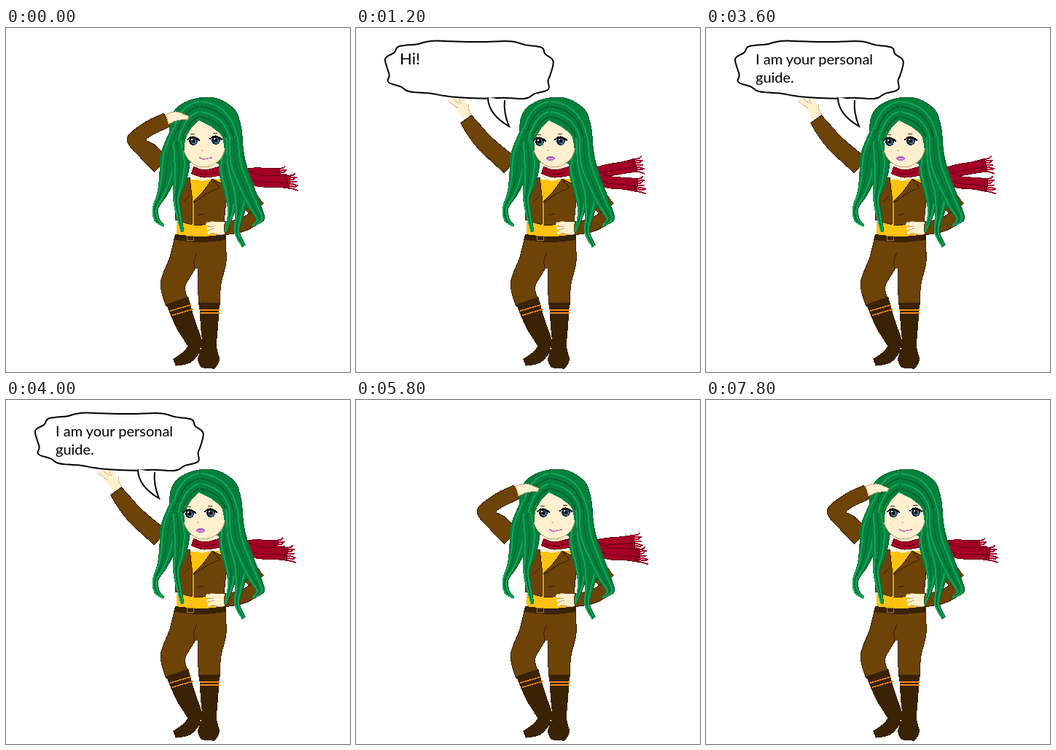
Recreate the animation shown at these times as an HTML page. Size 472 by 472 pixels, loop 8000 ms.

```html
<!DOCTYPE html>
<html lang="en">
<head>
<meta charset="utf-8">
<title>Guide</title>
<style>
html, body { margin: 0; width: 100%; height: 100%; overflow: hidden; background: #fff; }
svg { display: block; width: 100vw; height: 100vh; }
text { font: 20px Lato, "Open Sans", sans-serif; }
</style>
</head>
<body>
<svg id="stage" viewBox="0 0 472 472"></svg>
<script>
const stage = document.getElementById('stage');
const STEP = 200, LOOP = 8000;
const SKIN = '#fff0d0', TAN = '#c9a070', BROWN = '#6d4308', DARK = '#3a2204', GOLD = '#ffc20e', ORANGE = '#f08a1c',
  RED = '#a50027', WINE = '#610016', GREEN = '#04803c', LIGHT = '#10a558', DEEP = '#046030';

function add(tag, attrs, parent) {
  const el = document.createElementNS('http://www.w3.org/2000/svg', tag);
  for (const k in attrs) el.setAttribute(k, attrs[k]);
  return parent.appendChild(el);
}
const group = () => add('g', { 'shape-rendering': 'crispEdges' }, stage);
const parse = str => str.split(' ').map(s => s.split(',').map(Number));

// Smooth curve through a list of points
function curve(p, closed) {
  const n = p.length;
  const at = i => closed ? p[(i + n) % n] : p[Math.max(0, Math.min(n - 1, i))];
  let d = 'M' + p[0];
  for (let i = 0; i < (closed ? n : n - 1); i++) {
    const [a, b, c, e] = [at(i - 1), at(i), at(i + 1), at(i + 2)];
    d += `C${b[0] + (c[0] - a[0]) / 6},${b[1] + (c[1] - a[1]) / 6} ` +
      `${c[0] - (e[0] - b[0]) / 6},${c[1] - (e[1] - b[1]) / 6} ${c}`;
  }
  return d + (closed ? 'Z' : '');
}
// Spine points x,y,halfWidth moved sideways by f half widths
function side(spine, f) {
  return spine.map(([x, y, w], i) => {
    const a = spine[Math.max(0, i - 1)], b = spine[Math.min(spine.length - 1, i + 1)];
    const dx = b[0] - a[0], dy = b[1] - a[1], k = f * w / Math.hypot(dx, dy);
    return [x - dy * k, y + dx * k];
  });
}
const stroke = (g, d, color, w = 1) =>
  add('path', { d, fill: 'none', stroke: color, 'stroke-width': w, 'stroke-linecap': 'round' }, g);
const line = (g, str, color, w) => stroke(g, curve(parse(str)), color, w);
const blob = (g, str, fill, edge) => add('path', { d: curve(parse(str), true), fill, stroke: edge }, g);
const poly = (g, points, fill, edge = 'none') => add('polygon', { points, fill, stroke: edge }, g);
const oval = (g, cx, cy, rx, ry, fill) => add('ellipse', { cx, cy, rx, ry, fill }, g);
const limbPath = spine =>
  curve(side(spine, 1)) + curve(side(spine, -1).reverse()).replace('M', 'L') + 'Z';
const limb = (g, str, fill, edge = 'none') => add('path', { d: limbPath(parse(str)), fill, stroke: edge }, g);

// Scarf tails and raised arms
const scarf = group();
const tails = [0, 1].map(() => ({
  fringe: stroke(scarf, '', RED, 2),
  cloth: add('path', { fill: RED, stroke: WINE }, scarf),
  fold: stroke(scarf, '', WINE)
}));

const saluteArm = group();
limb(saluteArm, '213,188,13 194,169,13 179,153,13 196,138,10 221,126,10', BROWN, DARK);

const waveArm = group();
for (let i = 0; i < 4; i++) stroke(waveArm, `M${142 + 2 * i},108L${129 + 6.5 * i},${100 - 2 * (i % 3)}`, SKIN, 5);
limb(waveArm, '153,123,6 147,111,8 141,104,7', SKIN);
stroke(waveArm, 'M127,101l13,9M133,97l9,7M141,98l4,6M154,105l0,6l5,8', '#dcb98b');
limb(waveArm, '151,125,9 162,140,11 178,159,12 212,189,13', BROWN, DARK);

// Legs, boots and torso
const body = group();
limb(body, '301,217,12 325,228,14 345,249,12', BROWN);
limb(body, '348,256,10 325,270,9 299,275,9', BROWN, DARK);
limb(body, '284,287,17 283,320,19 279,350,16 279,380,14', BROWN, DARK);
limb(body, '250,287,18 243,320,19 229,352,17 235,378,16', BROWN, DARK);
poly(body, '250,288 284,288 272,330 258,330', BROWN);
line(body, '259,331 258,319 262,308', DARK);
limb(body, '235,374,16 246,405,14 258,430,11 261,441,9', DARK);
limb(body, '262,436,9 248,452,9 231,459,5', DARK);
limb(body, '279,377,14 279,410,12 279,436,10 278,455,15 277,467,9', DARK);
for (const y of [0, 6]) {
  stroke(body, `M${226 + y / 2},${388 + y}l27,-8`, ORANGE, 1.5);
  stroke(body, `M267,${387 + y * .7}l26,0`, ORANGE, 1.5);
}

poly(body, '236,208 295,207 298,286 234,286', GOLD);
poly(body, '254,188 290,188 283,207 268,210 255,205', SKIN);
poly(body, '234,212 252,205 256,238 255,270 232,263', BROWN, DARK);
poly(body, '283,207 297,214 302,238 299,266 270,270 257,271 257,238 270,225', BROWN, DARK);
stroke(body, 'M257,240V271', '#b58a45');
stroke(body, 'M283,207l10,12l-17,8l-18,12M252,230l-9,9M263,257l9,-2', DARK);
limb(body, '232,287,4 267,290,4 302,287,4', DARK);
add('rect', { x: 248, y: 285, width: 9, height: 6, fill: DARK, stroke: '#a37a38' }, body);
limb(body, '299,275,9 288,274,8 280,273,6', SKIN);
for (let i = 0; i < 3; i++) stroke(body, `M284,${268 + 5 * i}l${-8 + i},${1 + i}`, SKIN, 4);
stroke(body, 'M286,265l-11,2M277,272l8,0M278,277l8,-2M280,282l18,2', TAN);
limb(body, '256,195,5 272,200,5 294,196,6', RED, WINE);
line(body, '260,197 273,201 289,197', WINE);

// Hair: a cap plus tapering locks, each with strands along its length
const hair = group();
blob(hair, '236,108 260,97 286,96 307,106 319,122 324,160 310,190 270,180 235,190 216,182 224,150 226,125', GREEN, DEEP);
for (let i = 0; i < 4; i++) {
  const color = i % 2 ? DEEP : LIGHT;
  stroke(hair, `M264,${101 + 7 * i}Q${230 + 4 * i},${108 + 8 * i} ${228 + 4 * i},${162 + 4 * i}`, color, 2);
  stroke(hair, `M268,${101 + 7 * i}Q${316 - 4 * i},${106 + 8 * i} ${319 - 5 * i},168`, color, 2);
}
[
  '236,140,10 226,175,14 221,206,11 214,228,7 205,247,4 207,263,4 216,271,1',
  '236,155,9 240,185,12 238,212,9 234,234,5 237,256,4 242,279,2',
  '303,165,7 303,195,11 309,225,10 309,252,5 301,279,1',
  '310,150,11 314,190,13 323,225,13 320,258,6 317,280,4 326,299,3',
  '314,150,10 317,185,12 328,215,11 340,242,9 349,262,6 339,271,1'
].forEach(str => {
  limb(hair, str, GREEN);
  const spine = parse(str);
  [-.9, -.4, .2, .7].forEach((f, i) => stroke(hair, curve(side(spine, f)), i % 2 ? LIGHT : DEEP, 1 + i % 2));
});

// Faces
blob(hair, '264,126 282,135 297,149 300,167 290,184 271,191 254,184 244,167 246,146', SKIN, TAN);
line(hair, '264,125 253,137 245,152 243,168', GREEN, 3);
line(hair, '264,125 282,134 297,147 301,165', GREEN, 3);

function eye(g, x, y) {
  oval(g, x, y, 8, 6, '#fff');
  oval(g, x, y, 6, 6, '#0b1119');
  oval(g, x + 1, y + 1, 4, 4, '#3f6680');
  oval(g, x, y, 2.5, 2.5, '#000');
  oval(g, x - 2, y - 2, 1.5, 1.5, '#fff');
  stroke(g, `M${x - 8},${y - 2}Q${x},${y - 10} ${x + 8},${y - 1}`, '#000', 1.5);
  stroke(g, `M${x - 4},${y - 9}l6,-1`, '#3c2a18');
}
function face(x, y, gap, noseX) {
  const g = group();
  eye(g, x, y);
  eye(g, x + gap, y - 1);
  stroke(g, `M${noseX},167l3,2`, '#d8b186');
  return g;
}
const calm = face(257, 155, 31, 268);
line(calm, '266,178 271,180 276,179 282,178', '#c56cb8', 1.5);
const talking = face(252, 156, 29, 262);
oval(talking, 267, 179, 6, 3, '#b25cba');
stroke(talking, 'M263,179h8', '#f2d0ee');

const saluteHand = group();
limb(saluteHand, '221,125,7 234,121,6 250,123,2', SKIN, TAN);

// Speech bubble: a wobbling rounded box that deepens to the right
const bubble = add('g', {}, stage);
const root = v => Math.sign(v) * Math.abs(v) ** .62;
const rim = Array.from({ length: 72 }, (_, i) => {
  const a = i / 72 * 2 * Math.PI, wave = 1 + .028 * Math.cos(11 * a + 1.2);
  const x = 155 + 113 * root(Math.cos(a)) * wave;
  const depth = Math.sin(a) > 0 ? 39 + (x - 155) * .06 : 38;
  return [x, 56 + depth * root(Math.sin(a)) * wave];
});
add('path', { d: curve(rim, true), fill: '#fff', stroke: '#000', 'stroke-width': 2 }, bubble);
add('path', { d: 'M181,95Q181,118 210,135Q202,115 204,99', fill: '#fff', stroke: '#000', 'stroke-width': 2 }, bubble);
const text1 = add('text', {}, bubble);
const text2 = add('text', { x: 68, y: 75 }, bubble);
const WORDS = 'I am your personal'.split(' ');

function drawTail(t, bend, x, y) {
  const spine = [[324, 199, 6], [345, bend, 8], [x - 18, (bend + y) / 2, 8], [x, y, 9]];
  t.cloth.setAttribute('d', limbPath(spine));
  t.fold.setAttribute('d', curve(side(spine, .2)) + `M${x - 5},${y - 7}l2,7l-2,7`);
  let d = '';
  for (let i = -3; i <= 3; i++) d += `M${x - 1},${y + i * 2.7}l6,${i / 2}l${4 + i % 2 * 2},${i % 2 * 2}`;
  t.fringe.setAttribute('d', d);
}

const show = (el, on) => el.setAttribute('display', on ? 'inline' : 'none');

function draw(ms) {
  const n = Math.floor(ms % LOOP / STEP);
  const speaking = n >= 4 && n <= 20;
  [saluteArm, saluteHand, calm].forEach(el => show(el, !speaking));
  [waveArm, talking, bubble].forEach(el => show(el, speaking));

  // The scarf flaps once in six steps, wider while speaking
  const turn = ((n < 4 ? n + 3 : n) + .5) / 6 * 2 * Math.PI;
  const amp = speaking ? .5 : .28;
  const lift = amp * (1 + Math.cos(turn)), reach = -8 * amp * Math.sin(turn);
  drawTail(tails[0], 200 - 5 * lift, 374 + 13 * lift + reach, 202 - 15 * lift);
  drawTail(tails[1], 209 + 2 * lift, 388 + reach, 211 + 5 * lift);

  const hi = n < 10;
  text1.setAttribute('x', hi ? 60 : 68);
  text1.setAttribute('y', 50);
  text1.style.fontSize = hi ? '22px' : '20px';
  text1.textContent = hi ? 'Hi!' : WORDS.slice(0, n - 9).join(' ');
  text2.textContent = n >= 14 ? 'guide.' : '';
}

const start = performance.now();
function tick() {
  draw(performance.now() - start);
  requestAnimationFrame(tick);
}
tick();
</script>
</body>
</html>
```
